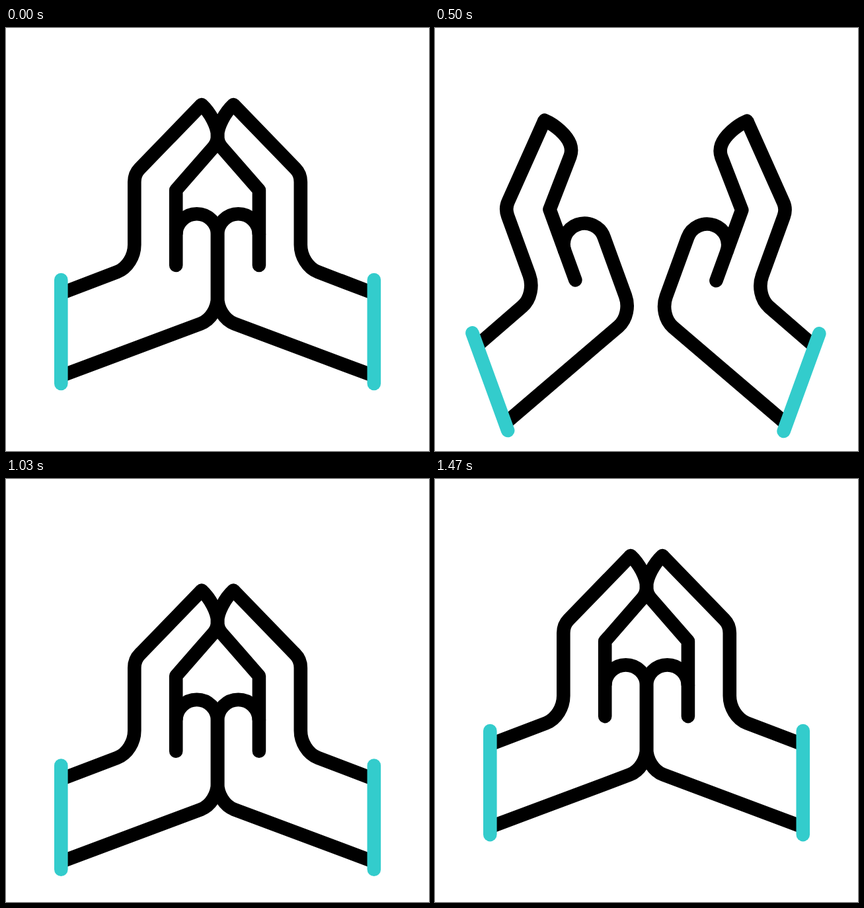
An HTML page for the animation above (1.67 s loop, 640x640 px).

```html
<!DOCTYPE html>
<html lang="en">
<head>
<meta charset="utf-8">
<title>Folded hands</title>
<style>
  html, body { margin: 0; width: 100%; height: 100%; overflow: hidden; background: #fff; }
  svg { display: block; width: 100%; height: 100%; }
</style>
</head>
<body>
<svg viewBox="0 0 640 640">
  <defs>
    <g id="hand" fill="none" stroke-width="20.6" stroke-linejoin="round">
      <g stroke="#000">
        <path stroke-linecap="round" d="M257.2 359V245.3L313.8 180.5C318 175.5 320.1 169 320.1 163C320.1 149 309 128 296 116"/>
        <path d="M83.3 401.5L168 369.2C184 363 194.3 345 194.3 328V233C194.3 225 197.5 217.5 202.5 212.5L296 116"/>
        <path d="M257.2 312.7A31.4 31.4 0 0 1 320.1 312.7V407.5C320.1 424 310 441.5 294.5 447.4L83.3 526.4"/>
      </g>
      <path stroke="#33cccc" stroke-linecap="round" d="M83.3 381V538"/>
    </g>
  </defs>
  <g id="left"><use href="#hand"/></g>
  <g id="right"><use href="#hand" transform="translate(640.1 0) scale(-1 1)"/></g>
</svg>
<script>
  const LOOP = 1670, FPS = 30, TILT = 20, DROP = 72.5;
  const left = document.getElementById('left');
  const right = document.getElementById('right');

  // Smooth 0..1 ramp between two frame times
  function ease(f, from, to) {
    const p = Math.min(1, Math.max(0, (f - from) / (to - from)));
    return p * p * (3 - 2 * p);
  }

  function place(el, angle, px, py, dy) {
    el.setAttribute('transform', `translate(0 ${dy}) rotate(${angle} ${px} ${py})`);
  }

  function draw(ms) {
    const f = Math.floor((ms % LOOP + 4) * FPS / 1000);
    const tilt = TILT * (ease(f, 1, 12.4) - ease(f, 19.35, 28.4));
    const bob = -ease(f, 16.65, 25.6) + ease(f, 24.9, 34.2) - ease(f, 34.2, 44.2);
    place(left, -tilt, 94.5, 461.5, DROP * (ease(f, 5.5, 15.6) + bob));
    place(right, tilt, 543.5, 455, DROP * (ease(f, 4.8, 15.2) + bob));
  }

  const start = performance.now();
  function tick() {
    draw(performance.now() - start);
    requestAnimationFrame(tick);
  }
  draw(0);
  requestAnimationFrame(tick);
</script>
</body>
</html>
```
